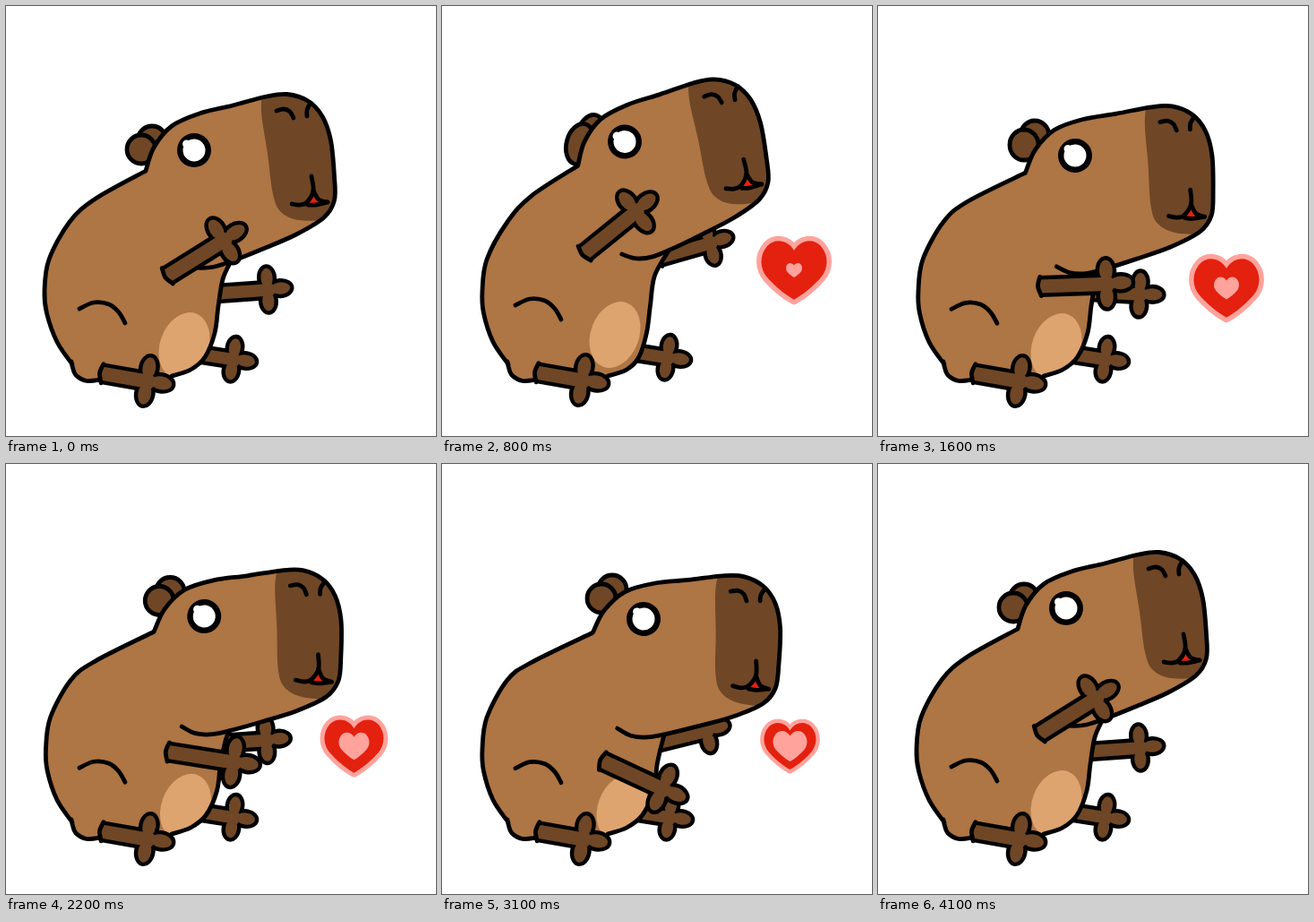
Write an HTML page with a canvas that moves like this. It is 480 by 480 pixels and loops after 4.2 s.

```html
<!DOCTYPE html>
<html lang="en">
<head>
<meta charset="utf-8">
<title>Capybara</title>
<style>
html, body { margin: 0; width: 100%; height: 100%; overflow: hidden; background: #fff; }
canvas { display: block; width: 480px; height: 480px; }
</style>
</head>
<body>
<canvas id="stage" width="480" height="480"></canvas>
<script>
const ctx = document.getElementById('stage').getContext('2d');
const FUR = '#ae7545', DARK = '#6f4726', BELLY = '#dea46f', RED = '#e4200f', PINK = '#ffa39c';
const LOOP = 4200, STEP = 100, LINE = 4.8;
const RAD = Math.PI / 180;

// near: base x, y, angle; far: paw x, y, angle, size; ear: x, y, rx, ry, angle
const rest = {
  head: [210, 161, 0], near: [179, 302, -32], far: [292, 317, -4, .9],
  ear: [151, 160, 16, 16, 0], belly: [0, 0], back: 0, feet: 0
};
const pose = changes => ({ ...rest, ...changes });
const reach = pose({ near: [185, 292, -39], far: [277, 340, 27, .9] });
const low = pose({
  head: [225, 173, 8], near: [178, 331, 25], far: [295, 298, -14, .9],
  ear: [178, 150, 16, 16, 0], belly: [2, 5], back: 2
});
const level = pose({
  head: [220, 167, 4], near: [180, 313, -2], far: [292, 322, 3, .9],
  ear: [163, 155, 16, 17, 0], belly: [0, 1], back: 2
});
const up = pose({
  head: [204, 151.5, -4], near: [158, 277, -39], far: [299, 265, -16, .9],
  ear: [154, 154, 15, 23, 15], belly: [-6, -12], back: 2, feet: -2
});
const tilt = pose({
  head: [199, 148, -8], near: [166, 277, -46], far: [286, 292, 8, 1.15],
  ear: [132, 167, 22, 14, -14], belly: [-5, -6], back: -1, feet: -2
});
const high = pose({
  ...tilt, head: [192, 132, -15], near: [164, 268, -50], far: [292, 276, 0, 1],
  ear: [137, 158, 20, 16, -10]
});

const moves = [
  [0, rest], [100, rest], [400, low], [500, low], [800, up], [900, up],
  [1100, high], [1200, tilt], [1300, tilt], [1600, level], [1900, low],
  [2100, low], [2500, reach], [2700, reach], [3100, low], [3300, low],
  [3900, rest], [LOOP, rest]
];

// heart: x, y, half width, half width of the inner heart
const none = [393, 295, 0, 0], dot = [393, 295, 9.5, 2], grown = [393, 295, 36.5, 9];
const full = [391.5, 293.5, 47.5, 14], small = [388.5, 315, 29, 19], big = [388.5, 315, 45, 11];
const beats = [
  [0, none], [100, none], [400, dot], [500, dot], [800, grown], [900, grown],
  [1100, [392, 294, 50, 13]], [1200, full], [1300, full], [1600, [389, 315, 36.5, 14]],
  [1900, small], [2100, small], [2500, big], [2700, big], [3100, small], [3300, small],
  [3600, big], [3900, [389, 315, 10, 3]], [4100, [389, 315, 0, 0]], [LOOP, none]
];

function mix(a, b, k) {
  if (typeof a === 'number') return a + (b - a) * k;
  if (Array.isArray(a)) return a.map((v, i) => mix(v, b[i], k));
  return Object.fromEntries(Object.keys(a).map(key => [key, mix(a[key], b[key], k)]));
}

function sample(track, t) {
  const i = track.findIndex(key => key[0] > t);
  const [t0, a] = track[i - 1], [t1, b] = track[i];
  return mix(a, b, (t - t0) / (t1 - t0));
}

// Smooth curve through points, joined to the current path
function curve(path, pts, join) {
  path[join ? 'lineTo' : 'moveTo'](...pts[0]);
  for (let i = 0; i < pts.length - 1; i++) {
    const p = pts[i], q = pts[i + 1], o = pts[i - 1] || p, r = pts[i + 2] || q;
    path.bezierCurveTo(
      p[0] + (q[0] - o[0]) / 6, p[1] + (q[1] - o[1]) / 6,
      q[0] - (r[0] - p[0]) / 6, q[1] - (r[1] - p[1]) / 6, q[0], q[1]);
  }
  return path;
}
const smooth = (...pts) => curve(new Path2D(), pts);

function fill(path, color) {
  ctx.fillStyle = color;
  ctx.fill(path);
}

function ink(path, width = LINE) {
  ctx.strokeStyle = '#000';
  ctx.lineWidth = width;
  ctx.stroke(path);
}

function oval(x, y, rx, ry, color) {
  const p = new Path2D();
  p.ellipse(x, y, rx, ry, 0, 0, 7);
  fill(p, color);
}
const disc = (x, y, r, color) => oval(x, y, r, r, color);

function placed(x, y, angle, draw) {
  ctx.save();
  ctx.translate(x, y);
  ctx.rotate(angle * RAD);
  draw();
  ctx.restore();
}

// Bar running along x with a three-toed paw at its end
function limb(x, y, angle, len, size = 1) {
  const half = 7.6 * Math.min(size, 1);
  placed(x, y, angle, () => {
    for (const [edge, color] of [[4.4, '#000'], [0, DARK]]) {
      const h = half + edge, long = 12 * size + edge, wide = 7.4 * size + edge;
      ctx.fillStyle = color;
      ctx.fillRect(0, -h, len, 2 * h);
      disc(len, 0, 9.5 * size + edge, color);
      oval(len, -15 * size, wide, long, color);
      oval(len + 16 * size, -size, long, wide, color);
      oval(len, 14 * size, wide, long, color);
    }
    ink(smooth([1, -half - 3], [-1.5, 0], [2, half + 3]));
  });
}

function ear(x, y, rx, ry, angle) {
  const p = new Path2D();
  p.ellipse(x, y, rx, ry, angle * RAD, 0, 7);
  fill(p, DARK);
  ink(p);
}

const EYE = [209, 161];
const skull = [
  [155, 184], [164, 158], [184, 134], [215, 120], [252, 111], [290, 101], [313, 98.5],
  [336, 106], [352, 123], [361.5, 150], [365.5, 190], [365.5, 217], [354, 236], [323, 255],
  [286, 271], [256, 283], [232, 291], [213, 292], [197, 286]
];
const skullPath = smooth(...skull);
const muzzle = smooth([286, 90], [284, 118], [291, 165], [297, 210], [306, 230], [326, 239], [360, 239]);
muzzle.lineTo(400, 239);
muzzle.lineTo(400, 90);
const tongue = new Path2D('M342 206L337 221L352 219Z');
const face = [
  smooth([301, 117], [309, 115], [316, 118], [320, 125]),
  smooth([335, 123], [335, 116], [339, 108]),
  smooth([340, 190], [342, 206], [335, 219], [327, 222], [318, 221]),
  smooth([342, 206], [348, 216], [358, 219]),
  smooth([336, 222], [345, 222], [358, 219])
];

function drawHead([x, y, angle]) {
  placed(x, y, angle, () => {
    ctx.translate(-EYE[0], -EYE[1]);
    fill(skullPath, FUR);
    ctx.save();
    ctx.clip(skullPath);
    fill(muzzle, DARK);
    ctx.restore();
    fill(tongue, RED);
    face.forEach(p => ink(p));
    ink(skullPath);
    disc(...EYE, 19, '#000');
    disc(...EYE, 12.5, '#fff');
    disc(EYE[0] - 8.5, EYE[1] - 7, 4.5, '#fff');
  });
}

function drawBody(p) {
  const [ex, ey, angle] = p.head;
  const c = Math.cos(angle * RAD), s = Math.sin(angle * RAD);
  const onHead = (x, y) => {
    const dx = x - EYE[0], dy = y - EYE[1];
    return [ex + dx * c - dy * s, ey + dx * s + dy * c];
  };
  const b = p.back, side = angle / 4 + p.belly[0] * .6;
  const back = [
    [74, 400], [57, 375], [45.5 + b / 2, 343], [43 + b, 318], [48 + b, 283],
    [71 + b, 241], [100, 215 + angle * .8], onHead(155, 184)
  ];
  const front = [
    onHead(250, 285), [242 + side, 305 + angle], [237 + side, 335],
    [233 + side, 365], [222 + side / 2, 392], [206, 406], [185, 413]
  ];
  const rump = [[107, 417], [90, 418.5], [78, 412], [74, 402], [73, 397]];

  const shape = curve(new Path2D(), back);
  curve(shape, front, true);
  curve(shape, rump, true);
  shape.closePath();
  fill(shape, FUR);

  ctx.save();
  ctx.clip(shape);
  const patch = new Path2D();
  patch.ellipse(199 + p.belly[0], 379 + p.belly[1], 27, 38, 20 * RAD, 0, 7);
  fill(patch, BELLY);
  ctx.restore();

  [back, front, rump].forEach(pts => ink(smooth(...pts)));
}

const heartPath = new Path2D(
  'M0-.6C.2-.95 .6-.98 .82-.74C1.07-.45 1.05-.05 .82 .22C.6 .47 .3 .73 0 .9' +
  'C-.3 .73-.6 .47-.82 .22C-1.05-.05-1.07-.45-.82-.74C-.6-.98-.2-.95 0-.6Z');

function drawHeart([x, y, r, inner]) {
  if (r < .5) return;
  ctx.save();
  ctx.translate(x, y);
  ctx.scale(r, r);
  ctx.strokeStyle = PINK;
  ctx.lineWidth = .3;
  ctx.stroke(heartPath);
  fill(heartPath, RED);
  ctx.scale(inner / r, inner / r);
  fill(heartPath, PINK);
  ctx.restore();
}

function draw(t) {
  const p = sample(moves, t);
  ctx.fillStyle = '#fff';
  ctx.fillRect(0, 0, 480, 480);
  ctx.lineCap = ctx.lineJoin = 'round';

  limb(205 + p.feet, 387 + p.feet, 9, 49, .88);
  const [fx, fy, fa, size] = p.far;
  limb(fx - 60 * Math.cos(fa * RAD), fy - 60 * Math.sin(fa * RAD), fa, 60, size);

  const [x, y, ...form] = p.ear;
  ear(x + 12, y - 10, ...form);
  ear(x, y, ...form);
  drawBody(p);
  drawHead(p.head);

  const lift = p.belly[1] / 3;
  ink(smooth([82, 338 + lift], [98, 331 + lift], [115, 333 + lift], [126, 342 + lift], [133, 354 + lift]));
  limb(106 + p.feet / 2, 410 + p.feet / 2, 10, 52);
  limb(...p.near, 75);
  drawHeart(sample(beats, t));
}

function tick() {
  const t = performance.now() % LOOP;
  draw(Math.floor(t / STEP) * STEP);
  requestAnimationFrame(tick);
}
tick();
</script>
</body>
</html>
```
